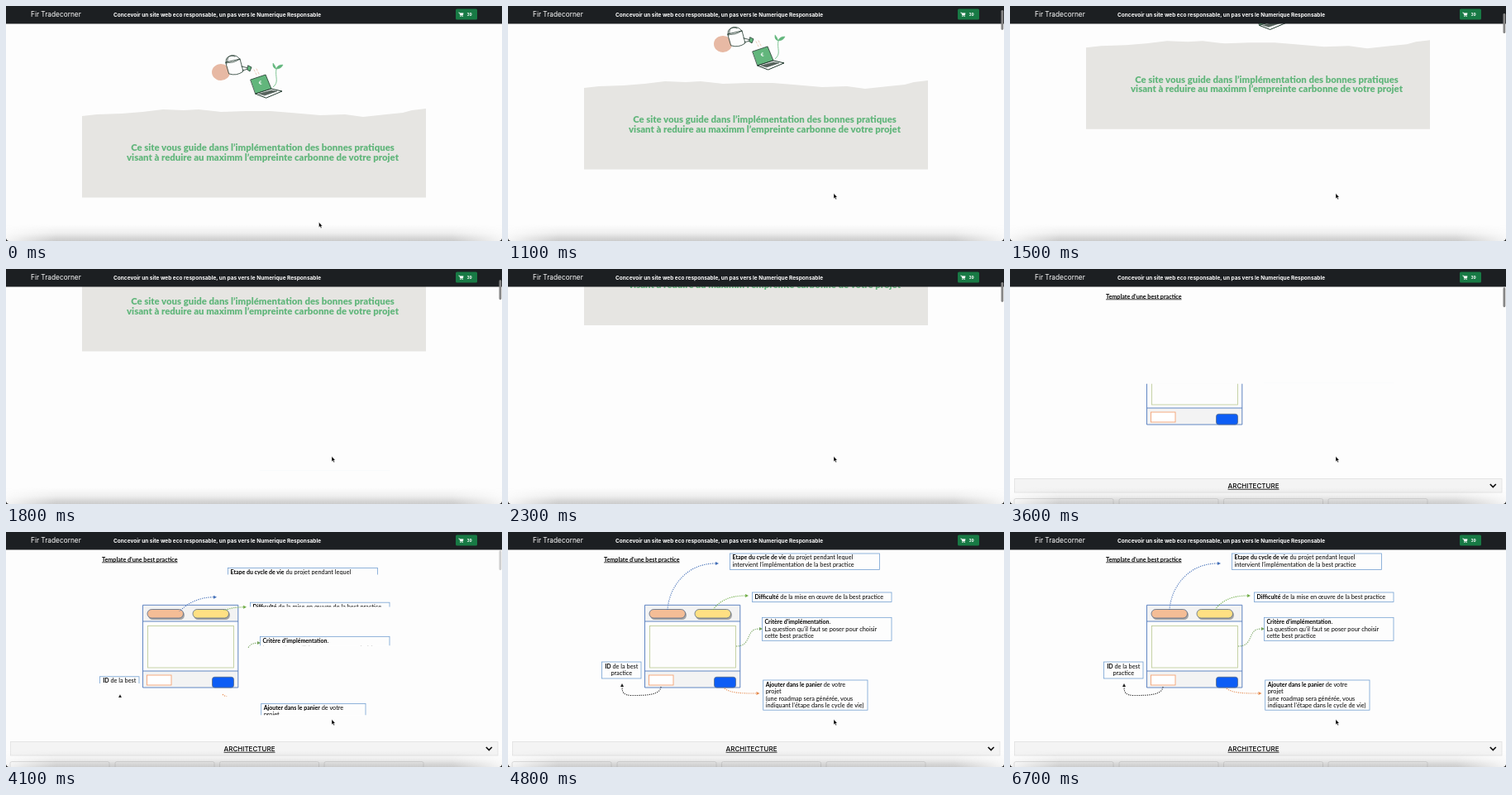
These frames come from a looping animation (600 px wide and 284 px high, 6800 ms). An HTML page:

```html
<!DOCTYPE html>
<html lang="fr">
<head>
<meta charset="utf-8">
<title>Best practices</title>
<style>
html, body { margin: 0; width: 100%; height: 100%; overflow: hidden; background: #fdfdfd; }
svg { display: block; width: 600px; height: 284px; }
.ui { font-family: Inter, Roboto, sans-serif; }
.note { font: 7.35px Lato, "Open Sans", sans-serif; fill: #000; }
.b { font-weight: 700; }
.note .b { font-size: 7px; }
.banner { font: 900 11.35px Lato, "Open Sans", sans-serif; fill: #62b67c; text-anchor: middle; }
.ink { fill: none; stroke: #20382c; stroke-width: .8; stroke-linecap: round; stroke-linejoin: round; }
</style>
</head>
<body>
<svg viewBox="0 0 600 284" xmlns="http://www.w3.org/2000/svg">
  <defs>
    <linearGradient id="shade" x1="0" y1="0" x2="0" y2="1">
      <stop offset="0" stop-color="#777" stop-opacity="0"/>
      <stop offset=".5" stop-color="#777" stop-opacity=".1"/>
      <stop offset="1" stop-color="#777" stop-opacity=".38"/>
    </linearGradient>
    <linearGradient id="ends">
      <stop offset="0" stop-color="#fff" stop-opacity=".15"/>
      <stop offset=".1" stop-color="#fff"/>
      <stop offset=".9" stop-color="#fff"/>
      <stop offset="1" stop-color="#fff" stop-opacity=".15"/>
    </linearGradient>
    <mask id="dim"><rect y="264" width="600" height="20" fill="url(#ends)"/></mask>
    <clipPath id="titleClip"><rect id="titleWipe" x="110" width="110" height="20"/></clipPath>
    <clipPath id="panelClip"><rect id="panelWipe" x="160" width="126" height="110"/></clipPath>
  </defs>
  <rect width="600" height="284" fill="#fdfdfd"/>

  <g id="intro">
    <ellipse cx="260" cy="80" rx="11" ry="10" fill="#e7b9a4"/>
    <g class="ink">
      <path d="M266 68L283 64L287 79Q279 85 270 82Z" fill="#fdfdfd"/>
      <path d="M266 68Q274 70 283 64M268 67C266 58 280 57 283 65M267 70C263 62 272 58 277 61"/>
      <path d="M285 73L293 75M286 78L293 76"/>
      <path d="M293 72L297 74L295 79L292 77Z" fill="#62b67c"/>
      <path d="M300 77l1 2M303 76l1 2M302 81l1 2M305 80l1 2" stroke="#e0a98f" stroke-width=".6"/>
      <path d="M296 89L314 83L321 100L302 106Z" fill="#62b67c"/>
      <path d="M302 106L321 100L334 103L315 111Z" fill="#fdfdfd" stroke-width="1"/>
      <path d="M306 106L321 102L328 103L313 108Z" fill="#59645e" stroke-width=".4"/>
      <path d="M323 98C331 92 325 86 327 76" stroke="#62b67c"/>
      <path d="M327 76Q328 71 335 71Q333 76 327 76Q325 71 323 69Q322 75 327 76" fill="#62b67c" stroke="#62b67c" stroke-width=".5"/>
    </g>
    <text class="ui b" x="305.500" y="95" font-size="6" fill="#fff" transform="rotate(-12 307 93)">€</text>
    <path d="M92 133L110 131L140 130L165 128L190 125L215 126L233 125L260 128L290 127L320 127L345 129L380 132L410 131L432 134L460 131L480 129L491 126L508 124V231.500H92Z" fill="#e6e5e2"/>
    <text class="banner" x="310.500" y="175.300">Ce site vous guide dans l’implémentation des bonnes pratiques</text>
    <text class="banner" x="310.500" y="186.800">visant à reduire au maximm l’empreinte carbonne de votre projet</text>
  </g>

  <g id="guide">
    <g clip-path="url(#titleClip)">
      <text class="note" x="116" y="35.500" text-decoration="underline"><tspan class="b" style="font-size:7.2px">Template d’une best practice</tspan></text>
    </g>
    <g clip-path="url(#panelClip)">
      <rect x="165.500" y="88.300" width="115.300" height="99.700" fill="#f3f3f3"/>
      <rect x="165.500" y="108" width="115.300" height="60" fill="#fdfdfd"/>
      <path d="M165.500 88.300H280.800V188H165.500ZM165.500 108H280.800M165.500 168H280.800" fill="none" stroke="#5079bd" stroke-width=".9"/>
      <g fill="#a5a5a5"><rect x="172" y="95" width="44" height="11" rx="5.500"/><rect x="227" y="95" width="44" height="11" rx="5.500"/></g>
      <g stroke="#566b88" stroke-width=".8">
        <rect x="171" y="93.500" width="43.500" height="10.500" rx="5.200" fill="#f4bd96"/>
        <rect x="226" y="93.500" width="43.500" height="10.500" rx="5.200" fill="#ffe083"/>
        <rect x="249.500" y="175.300" width="26" height="12.700" rx="3" fill="#0d5df5"/>
      </g>
      <rect x="171.500" y="113.500" width="104" height="50.500" fill="none" stroke="#b9c791" stroke-width=".8"/>
      <rect x="170.500" y="173" width="29.500" height="12" fill="#fff" stroke="#f3a273" stroke-width=".9"/>
    </g>
    <g id="notes"></g>
    <g class="ui">
      <rect x="5.500" y="253.500" width="589.500" height="16.500" fill="#f4f4f4" stroke="#e0e0e0" stroke-width=".8"/>
      <text x="294.500" y="264.800" font-size="8" font-weight="500" text-anchor="middle" text-decoration="underline">ARCHITECTURE</text>
      <path d="M580.800 260L584.300 263.500L587.800 260" fill="none" stroke="#111" stroke-width="1.700"/>
    </g>
    <g id="cards" fill="#fdfdfd" stroke="#d9d9d9" stroke-width=".8"></g>
  </g>

  <rect y="264" width="600" height="20" fill="url(#shade)" mask="url(#dim)"/>
  <path d="M0 281Q.5 283.500 3 284H0ZM600 281Q599.500 283.500 597 284H600Z" fill="#222"/>

  <g class="ui" fill="#fff">
    <rect width="600" height="21.500" fill="#1c1f22"/>
    <text x="30" y="13" font-size="8.300">Fir Tradecorner</text>
    <text class="b" x="130" y="12.500" font-size="6.500">Concevoir un site web eco responsable, un pas vers le Numerique Responsable</text>
    <rect x="544" y="3.500" width="26" height="13" rx="1.500" fill="#187a45"/>
    <path d="M547.500 8H548.700L549.500 11.200H552.500L553.200 8.700H549Z" stroke="#fff" stroke-width=".5"/>
    <circle cx="549.900" cy="12.400" r=".6"/><circle cx="552.200" cy="12.400" r=".6"/>
    <text class="b" x="557.500" y="11.900" font-size="4.800">39</text>
  </g>
  <rect id="thumb" x="596.500" width="2.800" height="24" rx="1.400" fill="#858585"/>
  <path id="cursor" d="M0 0V6.200L1.400 5L2.400 7.300L3.500 6.800L2.500 4.600H4.300Z" fill="#000" stroke="#fff" stroke-width=".4"/>
</svg>
<script>
const LOOP = 6800, END = 238;
const byId = id => document.getElementById(id);
const clamp = v => Math.max(0, Math.min(1, v));
const span = (t, from, to) => clamp((t - from) / (to - from));
const place = (el, x, y) => el.setAttribute('transform', `translate(${x} ${y})`);

// Piecewise linear value from [time, value] points.
function track(points, t) {
  for (let i = 1; i < points.length; i++) {
    const [t0, v0] = points[i - 1], [t1, v1] = points[i];
    if (t < t1) return v0 + (v1 - v0) * span(t, t0, t1);
  }
  return points[points.length - 1][1];
}

const scrollPath = [[700, 0], [1100, 34], [1400, 66], [1800, 132], [2100, 152], [3000, 204], [3300, 232], [3450, END]];

// Each note slides up from behind the lower edge of its own window.
const notes = [];
function addNote(x, top, width, height, content) {
  const id = 'note' + notes.length;
  byId('notes').insertAdjacentHTML('beforeend',
    `<clipPath id="${id}c"><rect x="${x}" y="${top}" width="${width}" height="${height}"/></clipPath>
     <g clip-path="url(#${id}c)"><g id="${id}">${content}</g></g>`);
  notes.push({ el: byId(id), height });
}

function addBox(x, y, w, h, lines, firstLine, anchor = 'start') {
  const tx = anchor === 'middle' ? x + w / 2 : x + 3;
  const text = lines.map((line, i) =>
    `<text class="note" text-anchor="${anchor}" x="${tx}" y="${firstLine + i * 8.5}">${line}</text>`).join('');
  addNote(x - 1, y - 1, w + 2, h + 7,
    `<rect x="${x}" y="${y}" width="${w}" height="${h}" fill="#fdfdfd" stroke="#6c9bcf" stroke-width=".75"/>${text}`);
}

function addArrow(x, top, width, height, path, color, tipX, tipY, angle = 0) {
  addNote(x, top, width, height,
    `<path d="${path}" fill="none" stroke="${color}" stroke-width="1.1" stroke-dasharray="1.2 1.3"/>
     <path d="M0 0L-4 -2V2Z" fill="${color}" transform="translate(${tipX} ${tipY}) rotate(${angle})"/>`);
}

const bold = s => `<tspan class="b">${s}</tspan>`;
addBox(268.5, 26, 181, 19.5, [bold('Etape du cycle de vie') + ' du projet pendant lequel',
  'intervient l’implémentation de la best practice'], 33.4);
addBox(295.5, 73, 168.5, 11.5, [bold('Difficulté') + ' de la mise en œuvre de la best practice'], 80.8);
addBox(307.5, 103.3, 156.5, 28, [bold('Critère d’implémentation') + '.',
  'La question qu’il faut se poser pour choisir', 'cette best practice'], 111);
addBox(308.7, 179, 126.3, 36.2, [bold('Ajouter dans le panier') + ' de votre', 'projet',
  '(une roadmap sera générée, vous', 'indiquant l’étape dans le cycle de vie)'], 186.5);
addBox(113.5, 157, 47.5, 20, [bold('ID') + ' de la best', 'practice'], 164.7, 'middle');
addArrow(190, 34, 67, 62, 'M193 94C195 66 216 38 251 38', '#4470b8', 255, 38);
addArrow(246, 74, 46, 21, 'M248 94C256 83 268 77 287 77', '#70ad47', 291, 77);
addArrow(274, 114, 34, 26, 'M276 138C296 138 286 117 304 117', '#72a05a', 308, 117);
addArrow(260, 188, 46, 11, 'M262 189C269 195 285 195 300 195', '#e58a4e', 304.500, 195);
addArrow(134, 180, 54, 20, 'M185 187C184 197 168 197.500 150 197.500C140 197.500 138 194 138 187', '#222', 138, 183, -90);

for (const x of [5, 132, 258.5, 385])
  byId('cards').insertAdjacentHTML('beforeend', `<rect x="${x}" y="277.5" width="120" height="30" rx="2"/>`);

function draw(t) {
  const scroll = track(scrollPath, t);
  place(byId('intro'), 0, -scroll);
  place(byId('guide'), 0, END - scroll);

  byId('titleWipe').setAttribute('y', 40 - 12 * span(t, 2750, 3250));
  byId('panelWipe').setAttribute('y', 192 - 106 * span(t, 3350, 3850));
  const rise = span(t, 3930, 4430);
  for (const { el, height } of notes) place(el, 0, height * (1 - rise));

  const move = span(t, 100, 700);
  place(byId('cursor'), 378.5 + 15.5 * move, 261.3 - 34.8 * move);
  byId('thumb').setAttribute('y', 2 + scroll * .085);
  byId('thumb').setAttribute('opacity', t < 750 ? 0 : 1 - span(t, 3950, 4200));
}

const start = performance.now();
function tick() {
  draw((performance.now() - start) % LOOP);
  requestAnimationFrame(tick);
}
tick();
</script>
</body>
</html>
```
